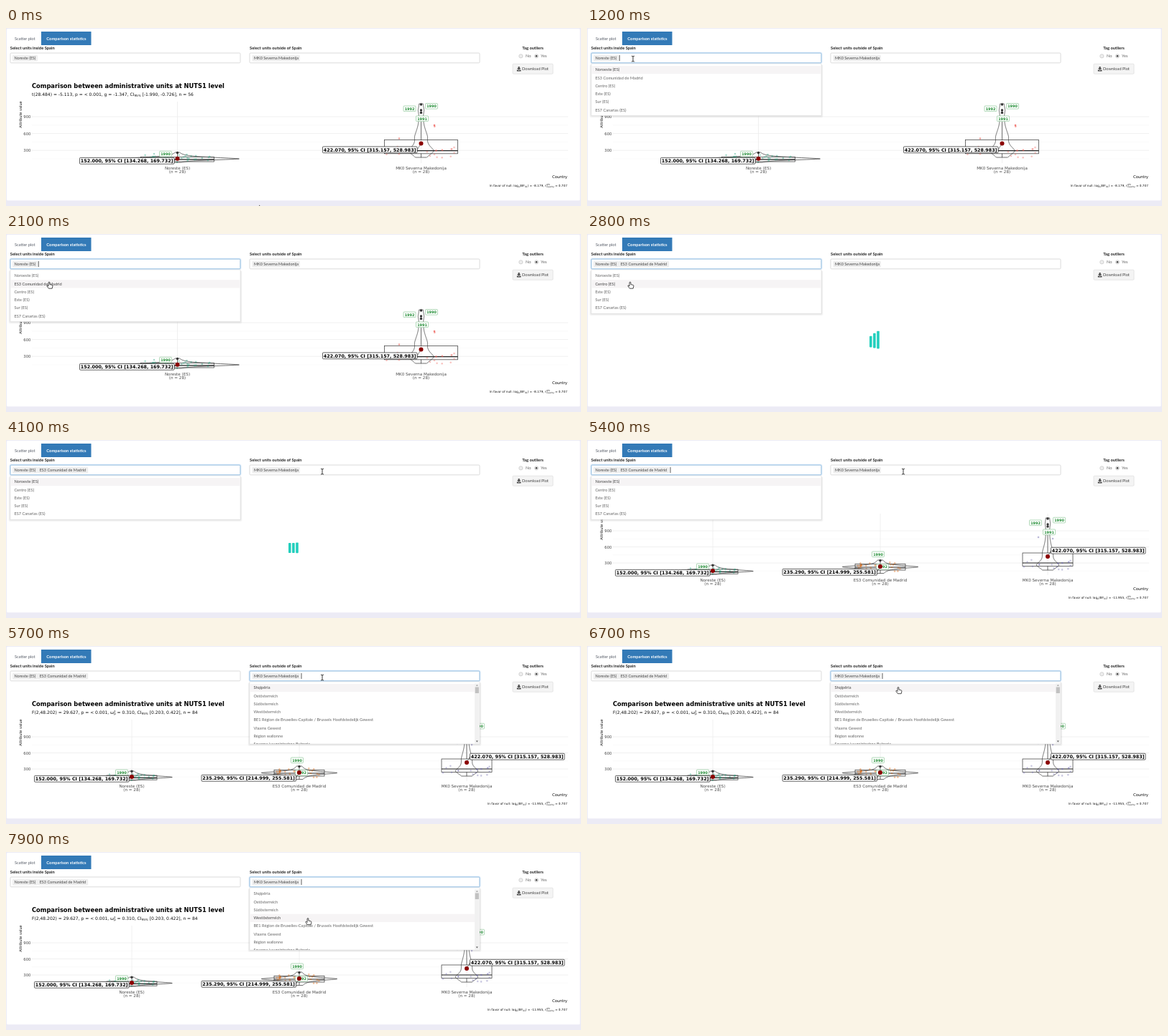
Write an HTML page that moves like this. It is 800 px wide and 249 px high and loops after 8000 ms.

```html
<!DOCTYPE html>
<html lang="en">
<head>
<meta charset="utf-8">
<title>Comparison statistics</title>
<style>
html, body { margin: 0; width: 100%; height: 100%; overflow: hidden; background: #ecebf5; }
svg { display: block; width: 800px; height: 249px; }
text { white-space: pre; }
.ui { font-family: Lato, "Open Sans", sans-serif; font-size: 5.66px; fill: #666; }
.b { font-weight: bold; font-size: 5.8px; fill: #222; }
.token { font-size: 5.5px; fill: #444; }
.plot { font-family: "DejaVu Sans", sans-serif; }
.mid { text-anchor: middle; }
.end { text-anchor: end; }
</style>
</head>
<body>
<svg id="stage" viewBox="0 0 800 249" xmlns="http://www.w3.org/2000/svg"></svg>
<script>
const LOOP = 8000, ROW = 11.24, ROW0 = 53;
const stage = document.getElementById('stage');

// ---------- drawing helpers ----------
const rect = (x, y, w, h, fill, stroke = 'none', more = '') =>
  `<rect x="${x}" y="${y}" width="${w}" height="${h}" fill="${fill}" stroke="${stroke}" ${more}/>`;
const line = (x1, y1, x2, y2, color, w) =>
  `<line x1="${x1}" y1="${y1}" x2="${x2}" y2="${y2}" stroke="${color}" stroke-width="${w}"/>`;
const dot = (x, y, r, fill, more = '') => `<circle cx="${x}" cy="${y}" r="${r}" fill="${fill}" ${more}/>`;
const ui = (x, cy, s, cls = '', more = '') =>
  `<text class="ui ${cls}" x="${x}" y="${cy + 2}" ${more}>${s}</text>`;
const label = (x, y, s, size, cls = '', fill = '#000', more = '') =>
  `<text class="${cls}" x="${x}" y="${y}" font-size="${size}" fill="${fill}" ${more}>${s}</text>`;
const shift = (s, dy, size) => `<tspan dy="${dy}" font-size="${size}">${s}</tspan>`;
const group = (id, body, more = '') => `<g id="${id}" ${more}>${body}</g>`;

function rng(seed) {
  return () => (seed = (seed * 16807) % 2147483647) / 2147483647;
}

// ---------- plot parts ----------
// bumps: [centre y, half width, spread]
function violin(cx, top, bottom, base, bumps) {
  const half = y => bumps.reduce((w, [m, a, s]) => w + a * Math.exp(-(Math.abs((y - m) / s) ** 1.6)), base);
  const left = [], right = [];
  for (let y = top; y <= bottom + 0.01; y += 0.5) {
    left.push(`${(cx - half(y)).toFixed(2)} ${y}`);
    right.unshift(`${(cx + half(y)).toFixed(2)} ${y}`);
  }
  return `<path d="M${left.concat(right).join('L')}Z" fill="none" stroke="#333" stroke-width=".7"/>`;
}

function scatter(cx, cy, sx, sy, n, color, seed) {
  const r = rng(seed);
  let s = '';
  for (let i = 0; i < n; i++) {
    const x = cx + (r() * 2 - 1) * sx, y = cy + (r() + r() - 1) * sy;
    s += dot(x.toFixed(1), y.toFixed(1), 1.3, color, 'opacity=".38"');
  }
  return s;
}

function box(cx, half, q3, median, q1, top, bottom) {
  return line(cx, top, cx, q3, '#333', .7) + line(cx, q1, cx, bottom, '#333', .7) +
    rect(cx - half, q3, half * 2, q1 - q3, 'none', '#333', 'stroke-width=".7"') +
    line(cx - half, median, cx + half, median, '#222', 1.2);
}

const year = (cx, cy, s) =>
  rect(cx - 8.5, cy - 4, 17, 7.6, '#fff', '#7fbf8a', 'rx="1" stroke-width=".6"') +
  label(cx, cy + 1.7, s, 4.9, 'mid', '#1b8a2f', 'font-weight="bold"');

const outliers = (cx, ys) => ys.map(y => dot(cx, y, 1.7, '#333')).join('');

const mean = (cx, cy, x, y, s) =>
  line(cx, cy, Math.min(Math.max(cx, x), x + 131.5), y, '#333', .6) +
  rect(x, y - 4.4, 131.5, 8.8, '#fff', '#222', 'rx="1" stroke-width=".7"') +
  label(x + 65.7, y + 2.4, s, 6.36, 'mid', '#000', 'font-weight="bold"') +
  dot(cx, cy, 3, '#8b0000');

function axes(ticks, units) {
  const step = ticks[1] - ticks[0];
  let s = '';
  ticks.forEach((y, i) => {
    s += line(36, y, 782, y, '#ececec', .8) + line(36, y + step / 2, 782, y + step / 2, '#f5f5f5', .5);
    s += label(34.5, y + 2.2, 900 - 300 * i, 5.4, 'end', '#4d4d4d');
  });
  for (const [x, name] of units) {
    s += line(x, 103, x, 189, '#ececec', .8);
    s += label(x, 197.8, name, 5.63, 'mid', '#4d4d4d') + label(x, 203.4, '(n = 28)', 5.63, 'mid', '#4d4d4d');
  }
  return s + label(0, 0, 'Attribute value', 5, 'mid', '#111', 'transform="translate(22 121) rotate(-90)"');
}

const headings = (sub, bf) =>
  label(36, 84.2, 'Comparison between administrative units at NUTS1 level', 8.3, '', '#000', 'font-weight="bold"') +
  label(36, 94.9, sub, 6, '', '#111') +
  label(781, 209.5, 'Country', 5.3, 'end', '#000') +
  label(763, 222, `In favor of null: log${shift('e', .9, 3)}${shift('(BF', -.9, 4.25)}${shift('01', .9, 3)}` +
    shift(`) = ${bf}, r`, -.9, 4.25), 4.25, 'end', '#111', 'transform="translate(-11.4 0)"') +
  label(752, 220.1, 'JZS', 2.9, '', '#111') + label(752, 223.3, 'Cauchy', 2.9, '', '#111') +
  label(781, 222, '= 0.707', 4.25, 'end', '#111');

const ci = (range, n) => `CI${shift('95%', 1.2, 4.2)}${shift(` [${range}], n = ${n}`, -1.2, 6)}`;
const MEAN_A = '152.000, 95% CI [134.268, 169.732]';
const MEAN_B = '235.290, 95% CI [214.999, 255.581]';
const MEAN_C = '422.070, 95% CI [315.157, 528.983]';
const TEAL = '#1b9e77', ORANGE = '#d95f02', VIOLET = '#7570b3', RED = '#f0605a';

function plotTwo() {
  const a = 238.5, c = 577.5;
  return axes([124, 147.6, 171.2], [[a, 'Noreste (ES)'], [c, 'MK0 Severna Makedonija']]) +
    headings('t(28.484) = -5.113, p = &lt; 0.001, g = -1.347, ' + ci('-1.990, -0.726', 56), '-8.179') +
    violin(a, 174, 188, 1.5, [[183, 78, 2.4], [180, 12, 4]]) +
    violin(c, 106, 181, 2.6, [[172, 14, 9], [152, 6, 14], [115, 1.5, 6]]) +
    box(a, 51, 180.3, 183.8, 187, 176, 188) + box(c, 51, 156.6, 171.6, 175.8, 131, 181) +
    scatter(a, 182, 45, 6, 26, TEAL, 77) + scatter(c, 173, 48, 10, 20, RED, 41) +
    dot(547, 154.5, 1.3, RED, 'opacity=".6"') + dot(596, 136, 1.3, RED, 'opacity=".8"') +
    dot(596.3, 137.8, 1.3, RED, 'opacity=".6"') + dot(206, 176, 1.2, TEAL, 'opacity=".4"') +
    outliers(a, [174.5]) + outliers(c, [107, 115, 118.5]) +
    year(222, 176.3, '1990') + year(561.5, 113, '1992') + year(592, 109.5, '1990') + year(579, 127, '1991') +
    mean(a, 182.8, 102.5, 185.8, MEAN_A) + mean(c, 161.6, 440.5, 170.3, MEAN_C);
}

function plotThree() {
  const a = 175, b = 408, c = 641;
  const omega = `ω${shift('2', -2.2, 4)}<tspan dx="-2.5" dy="3.6" font-size="4">p</tspan>`;
  return axes([127, 149.5, 172], [[a, 'Noreste (ES)'], [b, 'ES3 Comunidad de Madrid'], [c, 'MK0 Severna Makedonija']]) +
    headings(`F(2,48.202) = 29.627, p = &lt; 0.001, ${omega}${shift(' = 0.310, ', -1.4, 6)}` +
      ci('0.203, 0.422', 84), '-11.955') +
    violin(a, 175, 188, 1.5, [[183.5, 50, 2.3], [180.5, 9, 4]]) +
    violin(b, 168, 186.5, 2, [[177.5, 34, 2.2], [178, 17, 6]]) +
    violin(c, 109, 182, 2.4, [[175, 12, 7], [158, 5, 14], [117, 1.2, 6]]) +
    box(a, 35, 181, 184.3, 187.2, 177, 188) + box(b, 35, 173.5, 178, 182, 170, 186) +
    box(c, 35, 158, 172, 176.6, 133, 182) +
    scatter(a, 183, 31, 5, 24, TEAL, 77) + scatter(b, 177, 31, 8, 26, ORANGE, 19) +
    scatter(c, 174, 33, 9, 20, VIOLET, 41) +
    dot(628, 136, 1.3, VIOLET, 'opacity=".5"') + dot(648, 138, 1.3, VIOLET, 'opacity=".5"') +
    outliers(a, [175.2]) + outliers(b, [168.6]) + outliers(c, [110, 118, 121]) +
    year(161, 177, '1990') + year(405, 160, '1990') + year(411, 177.5, '1992') +
    year(624, 116, '1992') + year(657, 112.3, '1990') + year(643, 129, '1991') +
    mean(a, 183.1, 39.5, 185.8, MEAN_A) + mean(b, 176.9, 272, 184.8, MEAN_B) + mean(c, 162.9, 645.5, 154.7, MEAN_C);
}

// ---------- controls ----------
const token = (x, w, s) => rect(x, 38, w, 8.6, '#eeeeee', 'none', 'rx="1"') + ui(x + 2.5, 42.1, s, 'token');
const field = (id, x) => rect(x, 35, 320, 13.8, '#fff', '#d2d2d2', `id="${id}" rx="1.2" stroke-width=".8"`);
const glow = (id, x) => group(id,
  rect(x - .8, 34.2, 321.6, 15.4, 'none', '#cfe4f7', 'rx="2" stroke-width="1.4" opacity=".5"') +
  rect(x, 35, 320, 13.8, 'none', '#85bbea', 'rx="1.2" stroke-width=".8"'));
const radio = (x, on) => dot(x, 39.3, 2.6, '#eee', 'stroke="#bbb" stroke-width=".6"') + (on ? dot(x, 39.3, 1.3, '#444') : '');

function menu(id, x, bottom, items, extra = '') {
  const rows = items.map((s, i) => ui(x + 5.4, ROW0 + ROW * (i + .5) - .2, s, 'item')).join('');
  const shade = [1, 2, 3].map(d =>
    rect(x - d * .8, 51, 320 + d * 1.6, bottom - 51 + d, '#000', 'none', 'opacity=".035" rx="2"')).join('');
  return group(id, shade +
    rect(x, 50, 320, bottom - 50, '#fff', '#dcdcdc', 'stroke-width=".5"') +
    rect(x + .4, ROW0, 319.2, ROW, '#f6f4f5', 'none', 'class="active"') +
    `<svg x="${x}" y="50" width="320" height="${bottom - 50}" viewBox="${x} 50 320 ${bottom - 50}">${rows}</svg>` + extra);
}

const INSIDE = ['Noroeste (ES)', 'ES3 Comunidad de Madrid', 'Centro (ES)', 'Este (ES)', 'Sur (ES)', 'ES7 Canarias (ES)'];
const OUTSIDE = ['Shqipëria', 'Ostösterreich', 'Südösterreich', 'Westösterreich',
  'BE1 Région de Bruxelles-Capitale / Brussels Hoofdstedelijk Gewest', 'Vlaams Gewest', 'Région wallonne',
  'Severna i yugoiztochna Bulgaria'];
const scrollbar = rect(652, 52.5, 6.6, 84, '#f1f1f1') + rect(652.7, 57.5, 5.2, 8.5, '#c1c1c1') +
  '<path d="M653.8 55.8l1.5-1.8l1.5 1.8z" fill="#999"/><path d="M653.8 132.6l1.5 1.8l1.5-1.8z" fill="#555"/>';

const cursors =
  group('arrow', '<path d="M0 0V9.2L2.1 7.3L3.5 10.4L5 9.7L3.6 6.8H6.5Z" fill="#222" stroke="#fff" stroke-width=".5"/>') +
  group('ibeam', '<path d="M-2-3.8Q0-3.8 0-2.8Q0-3.8 2-3.8M0-3V3.2M-2 4Q0 4 0 3Q0 4 2 4" fill="none" stroke="#222" stroke-width=".9"/>') +
  group('hand', '<path d="M-.9.6Q0-.6.9.6V3.6L4 4.3Q5 4.6 4.9 5.8L4.2 9.2H-.6L-3 5.9Q-3.3 4.6-2 4.9L-.9 6Z" fill="#fff" stroke="#222" stroke-width=".8"/>');

stage.innerHTML =
  rect(0, 0, 800, 249, '#ecebf5') + rect(1, 1, 797.5, 240.3, '#fff', 'none', 'rx="1.5"') +
  ui(12, 15.2, 'Scatter plot', '', 'style="fill:#555b66"') +
  rect(49, 5, 69.5, 19, '#337ab7') + ui(84, 15.2, 'Comparison statistics', 'b mid', 'style="fill:#fff"') +
  group('two', plotTwo(), 'class="plot"') + group('three', plotThree(), 'class="plot"') +
  group('loader', [393, 398.1, 403.2].map(x => rect(x, 144, 3.6, 14, '#22cfbd', 'none', 'rx=".8"')).join('')) +
  ui(5.8, 28.2, 'Select units inside Spain', 'b') + ui(339, 28.2, 'Select units outside of Spain', 'b') +
  ui(733, 28.2, 'Tag outliers', 'b mid') +
  radio(716.3, false) + ui(723, 39.3, 'No') + radio(738, true) + ui(744, 39.3, 'Yes') +
  rect(705, 50.2, 56, 14, '#f4f4f4', '#ddd', 'rx="1.2" stroke-width=".7"') +
  '<path d="M712.6 54h2v2.2h1.7l-2.7 2.6l-2.7-2.6h1.7zM710.8 58.6h1.5l1.3 1.1l1.3-1.1h1.5v1.8h-5.6z" fill="#444"/>' +
  ui(718, 57.2, 'Download Plot', '', 'style="fill:#444"') +
  field('f1', 6) + field('f2', 339) + glow('glow1', 6) + glow('glow2', 339) +
  token(9, 35, 'Noreste (ES)') + group('madrid', token(44.2, 70, 'ES3 Comunidad de Madrid')) +
  token(342.5, 66.5, 'MK0 Severna Makedonija') +
  menu('menu6', 6, 122.6, INSIDE) + menu('menu5', 6, 111.2, INSIDE.filter((s, i) => i !== 1)) +
  menu('menuOut', 339, 137, OUTSIDE, scrollbar) +
  rect(0, 38, .8, 8, '#333', 'none', 'id="caret"') + group('pointer', cursors);

// ---------- motion ----------
const $ = id => document.getElementById(id);
const show = (id, on) => { $(id).style.display = on ? '' : 'none'; };
const bars = [...$('loader').children];
const menus = ['menu6', 'menu5', 'menuOut'].map($);

const OPEN = 1000, PICK = 2300, READY = 4800, SWITCH = 5600;
// time, x, y
const PATH = [[0, 352, 247], [300, 352, 247], [900, 64, 43], [1600, 64, 43], [2100, 60, 67], [3100, 60, 67],
  [3900, 440, 44], [6300, 440, 44], [6700, 433, 57.5], [7200, 433, 57.5], [7900, 420, 92.5], [LOOP, 420, 92.5]];

function pointerAt(t) {
  const i = PATH.findIndex((k, n) => n + 1 < PATH.length && t < PATH[n + 1][0]);
  const [t0, x0, y0] = PATH[i], [t1, x1, y1] = PATH[i + 1];
  const p = (t - t0) / (t1 - t0), e = p * p * (3 - 2 * p);
  return [x0 + (x1 - x0) * e, y0 + (y1 - y0) * e];
}

function barStretch(p) {
  p -= Math.floor(p);
  if (p < .42) return Math.cos(Math.PI / 2 * p / .42) ** 2;
  return p > .85 ? Math.sin(Math.PI / 2 * (p - .85) / .15) ** 2 : 0;
}

function caretX(t) {
  if (t < OPEN) return null;
  if (t < PICK) return (t - 900) % 1000 < 500 ? 44.8 : null;
  if (t < SWITCH) return t >= 3400 && (t - 3400) % 1000 < 500 ? 115.6 : null;
  return (t - SWITCH) % 1000 < 500 ? 410.6 : null;
}

function highlight(row) {
  for (const m of menus) {
    m.querySelector('.active').setAttribute('y', ROW0 + ROW * row);
    m.querySelectorAll('.item').forEach((item, i) => { item.style.fill = i === row ? '#444' : ''; });
  }
}

function draw(t) {
  const first = t >= OPEN && t < SWITCH, second = t >= SWITCH;
  const waiting = t >= PICK && t < READY;
  show('two', t < PICK);
  show('three', t >= READY);
  show('loader', waiting);
  show('madrid', t >= PICK);
  show('glow1', first);
  show('glow2', second);
  show('menu6', first && t < PICK);
  show('menu5', first && t >= PICK);
  show('menuOut', second);

  bars.forEach((bar, i) => {
    const s = barStretch((t - 2750) / 1000 + (2 - i) * .13);
    bar.setAttribute('y', 144 - 8.5 * s);
    bar.setAttribute('height', 14 + 11 * s);
  });

  const [x, y] = pointerAt(t);
  const left = second ? 339 : 6;
  const rows = second ? 7 : t < PICK ? 6 : 5;
  const row = Math.floor((y - ROW0) / ROW);
  const onRow = (first || second) && x > left && x < left + 320 && row >= 0 && row < rows;
  const onField = y > 35 && y < 49 && ((x > 6 && x < 326) || (x > 339 && x < 659));
  highlight(onRow ? row : 0);
  show('hand', onRow);
  show('ibeam', !onRow && onField);
  show('arrow', !onRow && !onField);
  $('pointer').setAttribute('transform', `translate(${x.toFixed(2)} ${y.toFixed(2)})`);

  const cx = caretX(t);
  show('caret', cx !== null);
  if (cx !== null) $('caret').setAttribute('x', cx);
}

// the screen refreshes ten times a second
const start = performance.now();
function tick() {
  const t = (performance.now() - start) % LOOP;
  draw(Math.floor(t / 100) * 100);
  requestAnimationFrame(tick);
}
tick();
</script>
</body>
</html>
```
